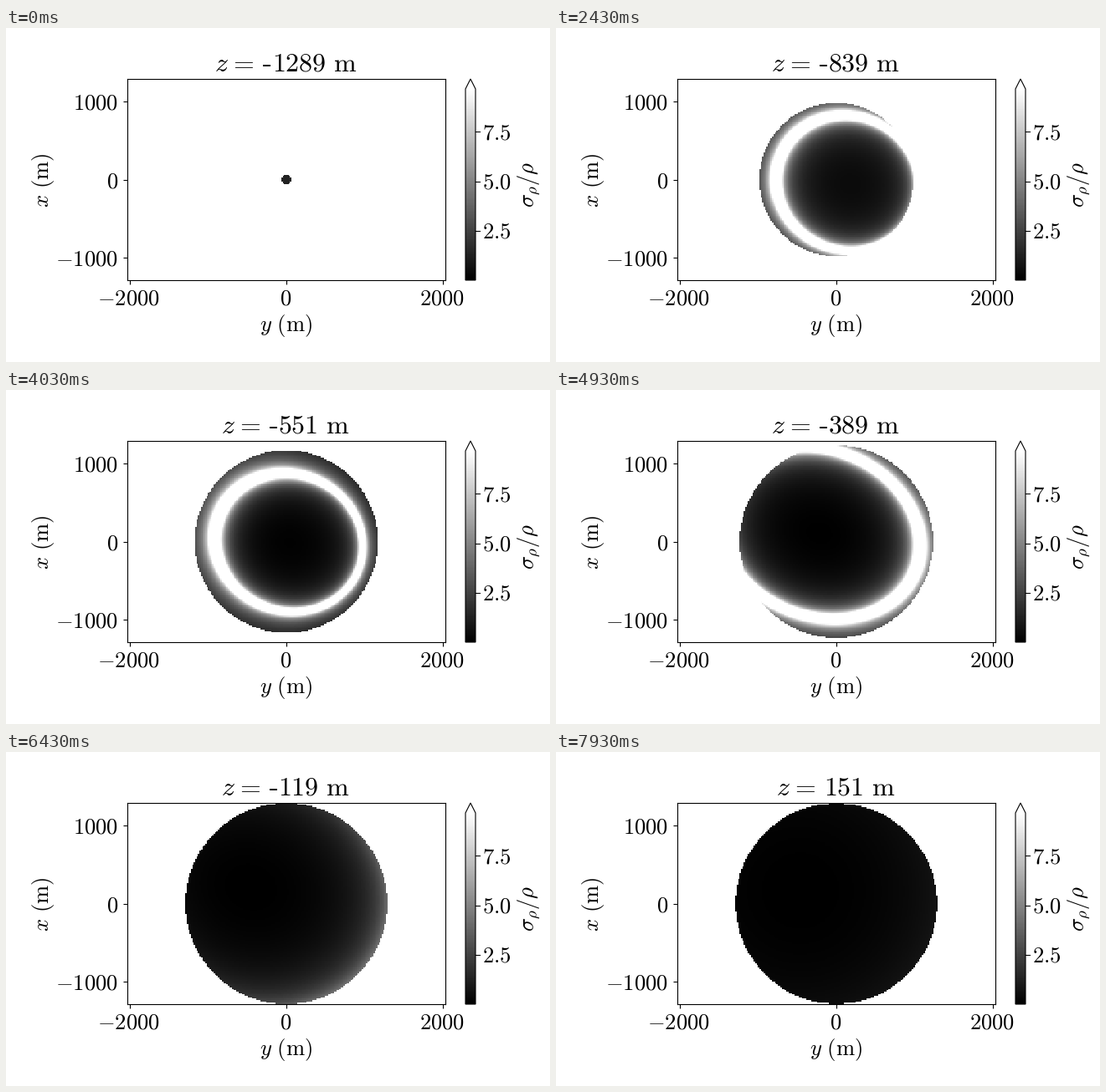
Animation of 650 by 400 pixels, one loop 8 s. Source, as a matplotlib script:

```python
import numpy as np
import matplotlib.pyplot as plt
from matplotlib.animation import FuncAnimation

plt.rcParams["mathtext.fontset"] = "cm"

W, H, DPI = 650, 400, 100
INTERVAL, LOOP = 20, 8000
RADIUS, STEP = 1290.6, 18
Z_START, Z_END = -1289, 151
VMAX = 9.64
LABEL_SIZE, TITLE_SIZE = 19.2, 23
EM = TITLE_SIZE * DPI / 72
TILT = -0.38

Y, X = np.meshgrid(np.arange(-2016, 2017, STEP), np.arange(-1278, 1279, STEP))


def relative_error(z):
    """Uncertainty over density on the slice at depth z, NaN outside the ball."""
    t = (z - Z_START) / (Z_END - Z_START)
    g = max(t - 0.49, 0)  # late growth of the shell where the density is zero

    # Centre and semi-axes of the shell in metres
    cy = 224 - 267 * t - 2450 * g + 3200 * g**2
    cx = -43 + 1390 * g - 1920 * g**2
    a = 960 - 160 * t + 3040 * g + 2030 * g**2
    b = 854 + 640 * g + 6400 * g**2

    dy, dx = Y - cy, X - cx
    s = (dy * np.cos(TILT) + dx * np.sin(TILT)) / a
    p = (dx * np.cos(TILT) - dy * np.sin(TILT)) / b
    level = s**2 + p**2

    skew = 0.8 * np.exp(-(((t - 0.42) / 0.1) ** 2))
    floor = np.exp(-((t / 0.3) ** 2))
    sigma = 0.13 * np.exp(-skew * np.clip(s, -1, 1))
    sigma = sigma * np.minimum(floor + (1 - floor) * level, 1.1)
    ratio = VMAX * sigma / np.maximum(np.abs(level - 1), 1e-6)
    return np.where(X**2 + Y**2 + z**2 <= RADIUS**2, ratio, np.nan)


fig = plt.figure(figsize=(W / DPI, H / DPI), dpi=DPI, facecolor="white")

# Map
left, right, top, bottom = 145, 525, 61, 302
ax = fig.add_axes([left / W, 1 - bottom / H, (right - left) / W, (bottom - top) / H])
cmap = plt.get_cmap("gray").copy()
cmap.set_bad("white")
image = ax.imshow(relative_error(Z_START), cmap=cmap, vmin=0, vmax=VMAX,
                  origin="lower", aspect="auto", interpolation="nearest",
                  extent=(-2025, 2025, -1287, 1287))
ax.set(xlim=(-2028, 2028), ylim=(-1286, 1286),
       xticks=[-2000, 0, 2000], yticks=[-1000, 0, 1000])
ax.tick_params(labelbottom=False, labelleft=False)

# Overlay in stage pixels for the text and the colour bar
stage = fig.add_axes([0, 0, 1, 1], facecolor="none")
stage.axis("off")


def label(x, y, text, ha="center", size=LABEL_SIZE, rotation=0):
    return stage.text(x, y, text, ha=ha, va="baseline", size=size,
                      rotation=rotation, rotation_mode="anchor")


for i in (-1, 0, 1):
    label(334.2 + 187.3 * i, 331.3, f"${2000 * i}$")
    label(134.3, 191 - 93.6 * i, f"${1000 * i}$", ha="right")
label(334.3, 363, r"$y\ \mathrm{(m)}$")
label(51, 182, r"$x\ \mathrm{(m)}$", rotation=90)
label(630, 187, r"$\sigma_\rho/\rho$", rotation=90)

# Colour bar with a pointed end
x0, x1, shoulder, tip = 549, 561, 73, 61
stage.imshow(np.linspace(1, 0, 256)[:, None], cmap="gray", aspect="auto",
             vmin=0, vmax=1, origin="upper", extent=(x0, x1, bottom, shoulder))
outline = [(x0, bottom), (x0, shoulder), ((x0 + x1) / 2, tip), (x1, shoulder), (x1, bottom)]
stage.add_patch(plt.Polygon(outline, fill=False, ec="black", lw=0.8))
for value in (2.5, 5.0, 7.5):
    y = 302.5 - 23.8 * value
    stage.plot([x1, x1 + 5], [y, y], color="black", lw=0.8)
    label(568.6, y + 9, f"${value}$", ha="left")
stage.set(xlim=(0, W), ylim=(H, 0))

# Title, laid out in ems around the centre of the map
TITLE_Y = 51.6
name = label(0, TITLE_Y, r"$z\hspace{0.078}=$", ha="left", size=TITLE_SIZE)
number = label(0, TITLE_Y, "", ha="left", size=TITLE_SIZE)
hyphen = plt.Rectangle((0, TITLE_Y - 0.245 * EM), 0.265 * EM, 0.06 * EM, color="black", lw=0)
stage.add_patch(hyphen)


def set_title(z):
    sign = 0.333 * (z < 0)
    digits = str(abs(z))
    total = 1.8 + sign + 0.5 * len(digits) + 0.333 + 0.833
    start = 334 - total * EM / 2
    name.set_x(start)
    hyphen.set_x(start + 1.81 * EM)
    hyphen.set_visible(z < 0)
    number.set_x(start + (1.8 + sign) * EM)
    number.set_text(rf"${digits}\ \mathrm{{m}}$")


def update(frame):
    # Slices change every 100 ms, the first one after 30 ms.
    z = Z_START + STEP * ((frame * INTERVAL + 90) // 100)
    image.set_data(relative_error(z))
    set_title(z)
    return image, name, number, hyphen


anim = FuncAnimation(fig, update, frames=LOOP // INTERVAL, interval=INTERVAL,
                     repeat=True, repeat_delay=0, blit=False)
plt.show()
```
